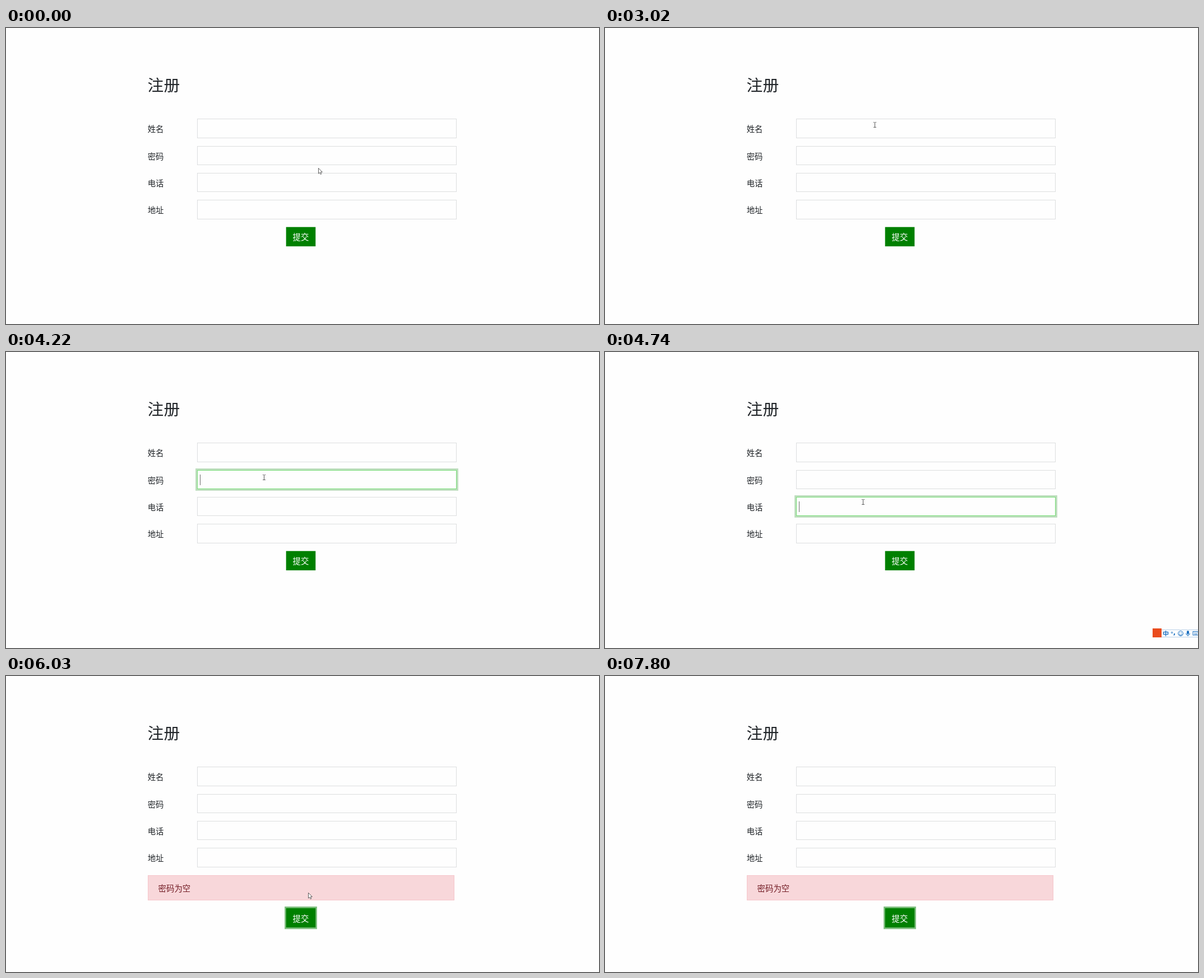
Animation of 1058 by 529 pixels, one loop 8.36 s. Source, as an HTML page with a canvas:

```html
<!DOCTYPE html>
<html lang="zh-CN">
<head>
<meta charset="utf-8">
<title>注册</title>
<style>
html, body { margin: 0; width: 100%; height: 100%; overflow: hidden; background: #fefefe; }
canvas { display: block; }
</style>
</head>
<body>
<canvas id="stage" width="1058" height="529"></canvas>
<script>
const ctx = document.getElementById('stage').getContext('2d');
const LOOP = 8360;
const FONT = '"Noto Sans CJK SC", "Noto Sans CJK", sans-serif';
const LABELS = ['姓名', '密码', '电话', '地址'];
const BUTTON = 4;
const ALERT_AT = 6030;
const RING = 2.9;
const BLUE = '#1a6fc0';

// Pointer: time, x, y, shape (arrow tip or beam centre)
const POINTER = [
  [0, 557, 250, 'a'], [1280, 555, 246, 'a'], [1410, 549, 238, 'i'], [1530, 536, 227, 'i'],
  [1650, 521, 217, 'i'], [1780, 510, 203, 'a'], [1930, 503, 187, 'i'], [2050, 498, 179, 'i'],
  [2200, 496, 175, 'i'], [2600, 495, 184, 'i'], [2720, 493, 195, 'i'], [2870, 489, 189, 'i'],
  [3020, 481, 173, 'i'], [3330], [3450], [3570], [3700, 478, 180, 'i'], [3820, 466, 198, 'a'],
  [3940, 461, 221, 'i'], [4090, 460, 224, 'i'], [4220], [4340], [4490, 460, 238, 'i'],
  [4610, 460, 266, 'i'], [4740, 460, 268, 'i'], [4860, 475, 306, 'i'], [5010, 478, 311, 'i'],
  [5130, 481, 314, 'i'], [5280], [5400, 514, 344, 'a'], [5520, 541, 396, 'a'], [5640],
  [5760, 540, 392, 'a'], [5910, 539, 387, 'a'], [6030], [6150], [6270], [6420, 537, 387, 'a'],
  [6690, 530, 431, 'a'], [6840, 528, 434, 'a'], [6960, 526, 439, 'a'], [7110, 525, 439, 'a'],
  [7260, 518, 455, 'a'], [7380, 492, 514, 'a'], [7500, 821, 520, 'a'], [7650, 955, 523, 'a'],
  [7800, 0, 0, '']
];

// Start of focus for each control, in order
const FOCUS = [3290, 4040, 4570, 5240, 5870, Infinity];

const clamp = v => Math.max(0, Math.min(1, v));
const mix = (a, b, k) => `rgb(${a.map((v, i) => Math.round(v + (b[i] - v) * k)).join()})`;

function rect(x, y, w, h, color) {
  ctx.fillStyle = color;
  ctx.fillRect(x, y, w, h);
}

function frame(x, y, w, h, color) {
  ctx.strokeStyle = color;
  ctx.lineWidth = 1;
  ctx.strokeRect(x + 0.5, y + 0.5, w - 1, h - 1);
}

function ring(x, y, w, h, alpha) {
  rect(x - RING, y - RING, w + 2 * RING, h + 2 * RING, `rgba(0,128,0,${alpha})`);
}

function text(str, x, y, size, color) {
  ctx.font = `400 ${size}px ${FONT}`;
  ctx.fillStyle = color;
  ctx.fillText(str, x, y);
}

function path(points, close) {
  ctx.beginPath();
  points.forEach(([x, y]) => ctx.lineTo(x, y));
  if (close) ctx.closePath();
}

function focusLevel(i, t) {
  return clamp((t - FOCUS[i]) / 150) * (1 - clamp((t - FOCUS[i + 1]) / 150));
}

function drawField(i, t) {
  const y = Math.round(162.4 + 48.3 * i);
  const h = Math.round(196.7 + 48.3 * i) - y;
  const k = focusLevel(i, t);
  if (k > 0) ring(341, y, 463, h, 0.26 * k);
  rect(341, y, 463, h, '#fefefe');
  frame(341, y, 463, h, mix([220, 222, 223], [120, 222, 120], k));
  const age = t - FOCUS[i];
  if (age >= 0 && t < FOCUS[i + 1] && age % 1060 < 530) rect(346, y + 8, 1, 19, '#6c6c6c');
  text(LABELS[i], 252.7, 186.3 + 48.3 * i, 14.4, '#212529');
}

function drawButton(t) {
  const y = t < ALERT_AT ? 355.7 : 414.9;
  const k = focusLevel(BUTTON, t);
  if (k > 0) ring(500, y, 52, 34.5, 0.5 * k);
  rect(499.7, y, 52.6, 34.5, '#008000');
  text('提交', 511.6, y + 23.7, 14.4, '#fff');
}

function drawAlert() {
  rect(253, 356, 547, 45, '#f8d7da');
  frame(253, 356, 547, 45, '#f5c6cb');
  text('密码为空', 271.6, 385, 14.4, '#721c24');
}

function drawInputBar() {
  rect(985, 496, 73, 14, '#fdfeff');
  frame(985, 496, 75, 14, '#b8cfe6');
  rect(977, 494, 16, 16, '#ea4c1d');
  ctx.strokeStyle = ctx.fillStyle = BLUE;
  ctx.lineWidth = 1.3;
  ctx.strokeRect(996.5, 500.5, 8, 4);
  path([[1000.5, 498], [1000.5, 508]]);
  ctx.stroke();
  // punctuation
  ctx.lineWidth = 1;
  ctx.beginPath();
  ctx.arc(1011.5, 501.5, 1.2, 0, 7);
  ctx.stroke();
  path([[1015, 503], [1017, 503], [1016.5, 506], [1014.5, 507]], true);
  ctx.fill();
  // face
  ctx.beginPath();
  ctx.arc(1027, 503, 4.4, 0, 7);
  ctx.moveTo(1029.4, 503.8);
  ctx.arc(1027, 503.8, 2.4, 0, Math.PI);
  ctx.stroke();
  rect(1025, 501, 1, 1.5, BLUE);
  rect(1028, 501, 1, 1.5, BLUE);
  // microphone
  ctx.beginPath();
  ctx.roundRect(1038, 498, 4, 6.5, 2);
  ctx.fill();
  ctx.beginPath();
  ctx.arc(1040, 502.7, 3.4, 0, Math.PI);
  ctx.moveTo(1040, 506);
  ctx.lineTo(1040, 508);
  ctx.stroke();
  // keyboard
  ctx.strokeRect(1049, 499.5, 10, 6.5);
  for (let x = 1051; x < 1058; x += 2) rect(x, 501, 1, 1, BLUE);
  rect(1051, 503.5, 6, 1, BLUE);
}

function drawPointer(x, y, shape) {
  ctx.save();
  ctx.translate(x, y);
  if (shape === 'a') {
    path([[0.5, 0.5], [0.5, 10.2], [2.7, 8.2], [4.2, 11.5], [5.8, 10.8], [4.4, 7.6], [7.3, 7.4]], true);
    ctx.fillStyle = '#fff';
    ctx.fill();
    ctx.strokeStyle = '#3a3a3a';
    ctx.lineWidth = 0.8;
    ctx.stroke();
  } else if (shape === 'i') {
    rect(0, -4, 1, 9, '#555');
    for (const top of [-5, 4]) {
      rect(-2, top, 2, 1, '#666');
      rect(1, top, 2, 1, '#666');
    }
  }
  ctx.restore();
}

function draw(ms) {
  let t = 0, pos;
  for (const [at, ...p] of POINTER) {
    if (at > ms) break;
    t = at;
    if (p.length) pos = p;
  }
  rect(0, 0, 1058, 529, '#fefefe');
  text('注册', 252.6, 113.3, 28.8, '#212529');
  LABELS.forEach((_, i) => drawField(i, t));
  if (t >= ALERT_AT) drawAlert();
  drawButton(t);
  if ((t >= 3450 && t < 4220) || (t >= 4610 && t < ALERT_AT)) drawInputBar();
  drawPointer(...pos);
}

const start = performance.now();
function tick() {
  draw((performance.now() - start) % LOOP);
  requestAnimationFrame(tick);
}
tick();
</script>
</body>
</html>
```
